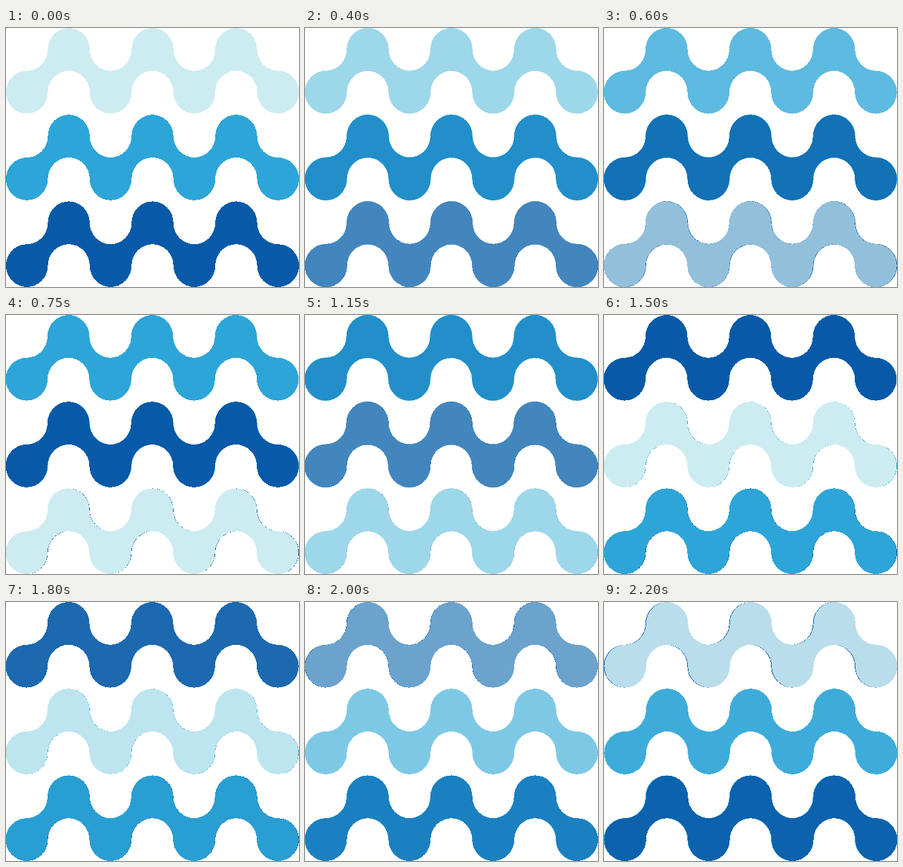
Recreate the animation shown at these times as an HTML page. Size 430 by 380 pixels, loop 2250 ms.

```html
<!DOCTYPE html>
<html lang="en">
<head>
<meta charset="utf-8">
<title>Waves</title>
<style>
  html, body { margin: 0; width: 100%; height: 100%; overflow: hidden; background: #fff; }
  svg { display: block; width: 430px; height: 380px; shape-rendering: crispEdges; }
</style>
</head>
<body>
<svg id="stage" viewBox="0 0 430 380"></svg>
<script>
const NS = 'http://www.w3.org/2000/svg';
const LIGHT = [205, 236, 241], MID = [45, 165, 216], DARK = [8, 90, 168];
const CYCLE = [LIGHT, MID, DARK];
const PHASE = 750, HOLD = 300, STEP = 50, LOOP = 3 * PHASE;
const RX = 430 / 14, RY = 31.4, PITCH = (380 - 4 * RY) / 2;
const SHIFT = 0.5, RIM = 0.6;

// Chain of round lobes joined by hollows of the same radius.
function wavePath() {
  const arc = (sweep, x, y) => `A${RX} ${RY} 0 0 ${sweep} ${x * RX} ${y * RY}`;
  const d = [`M0 ${3 * RY}`, arc(1, 1, 2), arc(0, 2, 1)];
  for (let i = 1; i <= 5; i++) d.push(arc(i % 2, 2 + 2 * i, 1));
  d.push(arc(0, 13, 2), arc(1, 14, 3));
  for (let i = 1; i <= 7; i++) d.push(arc(i % 2, 14 - 2 * i, 3));
  return d.join('') + 'Z';
}

const wave = wavePath();
function addPath() {
  const path = document.createElementNS(NS, 'path');
  path.setAttribute('d', wave);
  return document.getElementById('stage').appendChild(path);
}

function paint(path, row, dx, color, rim = 0) {
  const rgb = `rgb(${color})`;
  path.setAttribute('transform', `translate(${dx} ${row * PITCH})`);
  path.setAttribute('fill', rgb);
  path.setAttribute('stroke', rim ? rgb : 'none');
  path.setAttribute('stroke-width', rim);
}

const mix = (a, b, k) => a.map((v, i) => Math.round(v + (b[i] - v) * k));

// Each row: its first colour, the colour it fades from, and the moving top layer.
// The lower two show only as a thin edge where the top layer has drifted.
const rows = CYCLE.map(first => ({ first, base: addPath(), trail: addPath(), body: addPath() }));

function draw(now) {
  const t = now % LOOP;
  const phase = Math.floor(t / PHASE);
  const local = t - phase * PHASE;
  const k = local < HOLD ? 0 : (Math.floor((local - HOLD) / STEP) + 1) / 10;
  const dx = [-SHIFT * k, -SHIFT, SHIFT * (2 * k - 1)][phase];
  const trailDx = phase ? -SHIFT : 0;
  const rim = phase < 2 && k > 0 && k < 1 ? RIM : 0;
  rows.forEach((row, i) => {
    const from = CYCLE[(i + phase) % 3], to = CYCLE[(i + phase + 1) % 3];
    paint(row.base, i, 0, row.first);
    paint(row.trail, i, trailDx, from, rim);
    paint(row.body, i, dx, mix(from, to, k));
    row.trail.setAttribute('visibility', k < 1 ? 'visible' : 'hidden');
  });
}

const start = performance.now();
function tick() {
  draw(performance.now() - start);
  requestAnimationFrame(tick);
}
tick();
</script>
</body>
</html>
```
